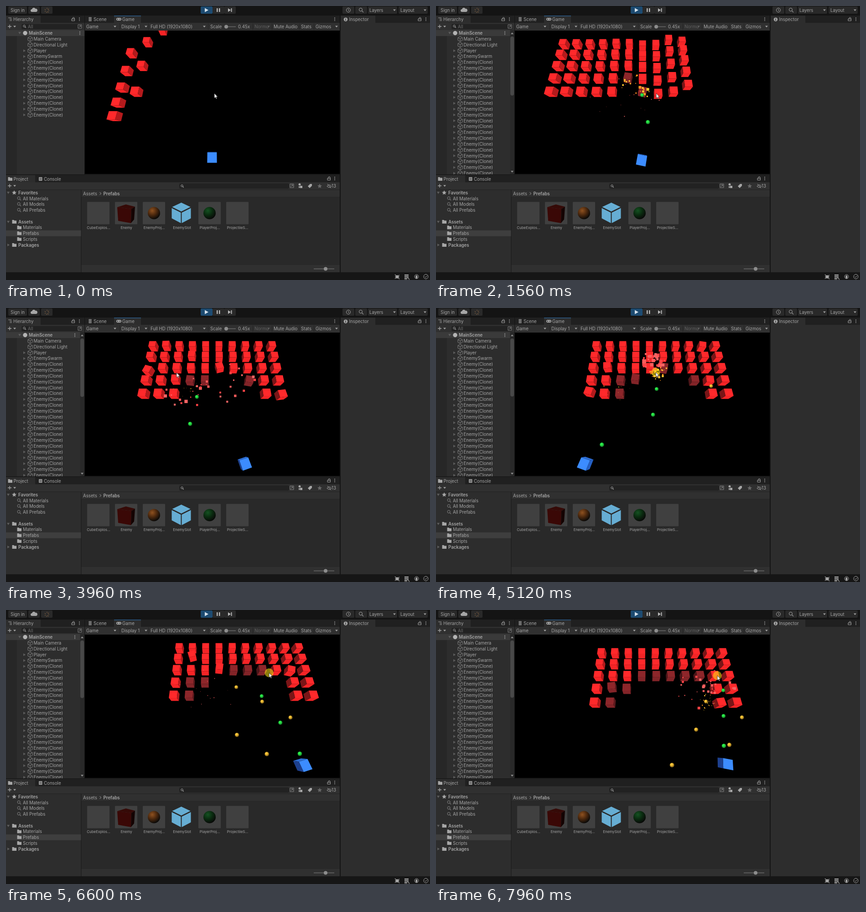
An HTML page with a canvas for the animation above (8000 ms loop, 930 px wide and 602 px high).

```html
<!DOCTYPE html>
<html lang="en">
<head>
<meta charset="utf-8">
<title>Editor play mode</title>
<style>
html, body { margin: 0; width: 100%; height: 100%; overflow: hidden; background: #141414; }
svg, canvas { position: absolute; left: 0; top: 0; }
canvas { left: 173px; top: 54px; }
text { font-family: Inter, Roboto, sans-serif; font-size: 9.7px; fill: #a6a6a6; white-space: pre; }
</style>
</head>
<body>
<svg id="ui" width="930" height="602"></svg>
<canvas id="game" width="559" height="315"></canvas>
<script>
const ui = document.getElementById('ui');
const INK = '#a6a6a6', PANEL = '#2d2d2d', STRIP = '#202020', BAR = '#303030';

/* ---------- editor interface ---------- */
function add(tag, attrs, parent = ui) {
  const el = document.createElementNS('http://www.w3.org/2000/svg', tag);
  for (const k in attrs) el.setAttribute(k, attrs[k]);
  return parent.appendChild(el);
}
const rect = (x, y, width, height, fill, rx = 0, p) => add('rect', { x, y, width, height, fill, rx }, p);
const disc = (cx, cy, r, fill, p) => add('circle', { cx, cy, r, fill }, p);
const ring = (cx, cy, r, stroke = INK) => add('circle', { cx, cy, r, stroke, fill: 'none' });
const fillPath = (d, fill = INK, p) => add('path', { d, fill }, p);
const line = (d, stroke = INK, w = 1, p) => add('path', { d, stroke, 'stroke-width': w, fill: 'none' }, p);
function label(x, y, str, opt = {}, p) {
  add('text', { x, y: y + 3.5, ...opt }, p).textContent = str;
}
const BOLD = { 'font-weight': 600 };
const caret = (x, y, c = INK) => fillPath(`M${x - 3} ${y - 1.5}h6l-3 3.5z`, c);
const fold = (x, y, open, p) => fillPath(open ? `M${x - 3} ${y - 2}h6l-3 5z` : `M${x - 2} ${y - 3}l5 3l-5 3z`, '#5c5c5c', p);
const dots = (x, y, p) => [-3, 0, 3].forEach(d => rect(x - .8, y + d - .8, 1.6, 1.6, INK, 0, p));
const plus = (x, y) => { line(`M${x - 4} ${y}h8M${x} ${y - 4}v8`, INK, 1.3); caret(x + 11, y); };
const lens = (x, y, r, c = INK) => { ring(x, y, r, c); line(`M${x + r * .7} ${y + r * .7}l${r} ${r}`, c, 1.2); };
const lock = (x, y) => line(`M${x - 3} ${y - .5}h6.5v4h-6.5zM${x - 1} ${y - 1}v-1a2 2 0 0 1 4 0v2`);
const popup = (x, y) => line(`M${x - 4} ${y - 4}h8v8h-8zM${x - 2} ${y + 2}l4 -4m-3 0h3v3`, '#858585');
const folder = (x, y) => fillPath(`M${x - 4.5} ${y - 4}h3.5l1.5 1.5h4.5v6.5h-9.5z`);
const box = (x, y, p) => line(`M${x} ${y - 5.5}l5 2.6v5.8l-5 2.6l-5 -2.6v-5.8zM${x - 5} ${y - 2.9}l5 2.6l5 -2.6M${x} ${y - .3}v5.8`, '#8c8c8c', .9, p);
const star = (x, y, c) => fillPath(`M${x} ${y - 5}l1.5 3.3l3.5 .4l-2.6 2.4l.7 3.5l-3.1 -1.8l-3.1 1.8l.7 -3.5l-2.6 -2.4l3.5 -.4z`, c);
const tab = (x, y, w) => rect(x, y, w, 17, PANEL);

// top toolbar
[[5, 41], [49, 25], [77, 25], [453, 26], [479, 25], [738, 26], [766, 26], [794, 64], [861, 64]]
  .forEach(([x, w]) => rect(x, 1, w, 16, '#292929', 2));
rect(427, 1, 26, 16, '#1d4b71', 2);
label(10, 9, 'Sign in'); label(797, 9, 'Layers'); label(865, 9, 'Layout');
caret(852, 9); caret(919, 9);
fillPath('M57 13a3 3 0 0 1 0 -6a4 4 0 0 1 7.5 -1a3.5 3.5 0 0 1 1.5 7z');
line('M90 4v2.5M94 6l-2 2M95 10h-2.5M93 14l-2 -2M89 15v-2.5M85 12l2 -1M85 7l2 1.5', '#7a5c40', 1.2);
fillPath('M436 4.5l8 4.5l-8 4.5z', '#d6e2ec');
fillPath('M462 5h2.5v8h-2.5zM467 5h2.5v8h-2.5zM487 5l6 4l-6 4zM493.5 5h2v8h-2z', '#b8b8b8');
ring(751, 9, 4.5); line('M751 6.5v3l2 1');
lens(778, 8, 3.5);

// hierarchy
rect(0, 21, 172, 349, PANEL); rect(0, 21, 172, 16, STRIP); tab(0, 21, 76);
rect(0, 37, 172, 16, BAR); rect(0, 53, 24, 317, '#272727'); rect(0, 53, 172, 13, '#3a3a3a');
line('M5 26h7M8 29h5M8 32h5'); label(16, 29, 'Hierarchy'); lock(147, 29); dots(161, 29);
plus(8, 45); rect(34, 39.5, 134, 11.5, '#222', 3); lens(40, 44, 2.2); label(48, 45, 'All', { style: 'fill:#6c6c6c' });
popup(162, 45);
fold(30, 59, true); disc(42, 59.5, 4.7, '#b4b4b4'); label(50, 59.5, 'MainScene', BOLD);
const sceneDots = add('g', {}); dots(162, 59.5, sceneDots);
const cloneRows = [];
['Main Camera', 'Directional Light', 'Player', 'EnemySwarm', ...Array(20).fill('Enemy(Clone)')].forEach((name, i) => {
  const g = add('g', {}), y = 72.5 + i * 12.83;
  if (i > 1) fold(40, y, false, g);
  box(53, y, g); label(60.5, y, name, {}, g);
  if (i > 3) cloneRows.push(g);
});
const scroller = add('g', {});
rect(162.5, 53, 9.5, 317, '#282828', 0, scroller);
fillPath('M164 62l3 -4l3 4zM164 362l3 4l3 -4z', '#8c8c8c', scroller);
const thumb = rect(163, 67, 8, 130, '#484848', 4, scroller);

// game panel
rect(173, 21, 559, 349, STRIP); tab(237, 21, 59); rect(237, 21, 59, 1.5, '#2a5a86');
rect(173, 37, 559, 17, BAR); rect(173, 54, 559, 315, '#000');
line('M181 26h7M181 29h7M181 32h7M183 24v10M186 24v10'); label(192, 29.5, 'Scene');
rect(242, 26, 11, 6, INK, 3); disc(245, 29, 1.2, PANEL); disc(250, 29, 1.2, PANEL); label(255, 29.5, 'Game');
dots(721, 29);
[[176, 'Game'], [253, 'Display 1'], [317, 'Full HD (1920x1080)'], [448, 'Scale'], [509, '0.45x'],
 [587, 'Mute Audio'], [647, 'Stats'], [679, 'Gizmos']].forEach(([x, s]) => label(x, 45.5, s));
label(545, 45.5, 'Normu', { style: 'fill:#606060' });
[239, 307, 435, 725].forEach(x => caret(x, 45)); caret(576, 45, '#606060');
line('M479 45.5h25', '#686868', 1.5); disc(483, 45.5, 4, '#8d8d8d');
[249, 312, 443, 541, 583, 643, 675].forEach(x => line(`M${x}.5 38v15`, '#242424'));

// inspector
rect(734, 21, 196, 564, PANEL); rect(734, 21, 196, 16, STRIP); tab(734, 21, 76);
disc(745, 29.5, 4.2, INK); line('M745 29v3M745 26.5v1.2', STRIP, 1.5); label(752.5, 29.5, 'Inspector');
lock(907, 29); dots(921, 29);

// project
rect(0, 370, 732, 215, PANEL); rect(0, 370, 732, 1.5, '#141414'); rect(0, 371.5, 732, 16, STRIP); tab(0, 371.5, 64);
rect(0, 387.5, 732, 16.5, BAR); rect(165, 404, 567, 16, BAR); rect(165, 420, 567, 149, '#292929'); rect(165, 569, 567, 16, BAR);
rect(164.5, 404, 1, 181, '#191919'); rect(0, 403.5, 732, .7, '#1c1c1c'); rect(166, 419.5, 566, .7, '#222');
folder(9, 380); label(16.5, 380, 'Project'); lock(708, 379); dots(721, 379);
rect(72, 376, 7.5, 8, INK, 1); line('M73 378.5h5.5M73 381.5h5.5', STRIP); label(83, 380, 'Console');
plus(8, 395); rect(380, 389.5, 241, 12, '#222', 3); lens(386, 395, 2.2);
popup(627, 395);
disc(644, 392, 2.5, INK); rect(645, 395, 5, 5, INK); rect(642, 396, 2.5, 3.5, INK);
fillPath('M662 396l5 -5h4v4l-5 5z'); star(688, 395.5, '#686868');
line('M704 396q5 -6 10 0q-5 5 -10 0M705 391l8 9'); label(714, 395.5, '13');
rect(0, 493, 164.5, 12.8, '#3e3e3e');
[['Favorites', 410, star], ['Assets', 474, folder], ['Packages', 525, folder]].forEach(([name, y, icon]) => {
  fold(5, y, name !== 'Packages'); icon(18, y, INK); label(27, y, name, BOLD);
});
['All Materials', 'All Models', 'All Prefabs'].forEach((s, i) => { const y = 423 + i * 12.8; lens(28, y - 1, 3, '#858585'); label(37, y, s); });
['Materials', 'Prefabs', 'Scripts'].forEach((s, i) => { const y = 486.5 + i * 12.8; folder(29, y); label(37, y, s); });
label(169, 412, 'Assets'); line('M205.5 409l3 3l-3 3'); label(213.5, 412, 'Prefabs', BOLD);

function ball(cx, cy, light, dark, id) {
  const g = add('radialGradient', { id, cx: .36, cy: .3, r: .72 });
  [light, dark, '#080807'].forEach((c, i) => add('stop', { offset: i / 2, 'stop-color': c }, g));
  disc(cx, cy, 13.5, `url(#${id})`);
}
['CubeExplos...', 'Enemy', 'EnemyProj...', 'EnemySlot', 'PlayerProj...', 'ProjectileS...'].forEach((s, i) => {
  const x = 178 + i * 61;
  if (i !== 3) rect(x, 430.5, 49, 49, '#404040', 1);
  label(x + 25, 486.5, s, { 'text-anchor': 'middle', style: 'font-size:7.9px' });
});
fillPath('M244 442l19 -6l20 5l-8 5z', '#350a07'); fillPath('M244 442l31 4l-1 31l-28 -5z', '#3a0806'); fillPath('M275 446l8 -5l-2 28l-7 8z', '#140403');
ball(324.5, 455, '#8f5220', '#4d290e', 'amber'); ball(446.5, 455, '#155222', '#0a2c10', 'leaf');
fillPath('M384.5 432l20 9.5l-20 10l-20 -10zM363.5 444l20 10v23l-20 -10.5zM405.5 444l-20 10v23l20 -10.5z', '#66add3');
line('M675 577.5h45', '#686868', 1.5); disc(701, 577.5, 4, '#8d8d8d');

// status bar
rect(0, 585, 930, 17, '#161616');
disc(858, 595, 3.5, INK); line('M853 590l10 10M853 595h10M853 599l3 -2M863 591l-3 2', INK, 1.2);
[590, 594, 598].forEach(y => rect(874, y, y < 598 ? 9 : 6, 2.5, INK)); line('M881 597l4 4', INK, 1.2);
ring(900.5, 594.5, 4.5); rect(898.5, 592, 4, 7, INK, 1);
ring(921, 594.5, 5); line('M918.5 594.5l2 2l3.5 -4');

/* ---------- camera ---------- */
const ctx = document.getElementById('game').getContext('2d');
ctx.translate(-173, -54);
const MID_X = 452.5, MID_Y = 211.5, FOCAL = 273, CAM_H = 13.8;
const SIN = Math.sin(1.227), COS = Math.cos(1.227);
const depth = (h, z) => (CAM_H - h) * SIN + z * COS;
function project(x, h, z) {
  const d = depth(h, z);
  return [MID_X + FOCAL * x / d, MID_Y - FOCAL * (z * SIN - (CAM_H - h) * COS) / d];
}
function ground(sx, sy) {
  const m = (MID_Y - sy) / FOCAL, z = CAM_H * (m * SIN + COS) / (SIN - m * COS);
  return [(sx - MID_X) / FOCAL * depth(0, z), z];
}
function track(keys, t) {
  let i = 0;
  while (i < keys.length - 2 && t > keys[i + 1][0]) i++;
  const [a, b] = [keys[i], keys[i + 1]], p = Math.max(0, Math.min(1, (t - a[0]) / (b[0] - a[0])));
  return a.slice(1).map((v, k) => v + (b[k + 1] - v) * p);
}
function seeded(seed) {
  let s = seed * 7919 + 17;
  const next = () => (s = (s * 16807) % 2147483647) / 2147483647;
  next(); next();
  return next;
}

/* ---------- choreography ---------- */
const PITCH = 1.84, CUBE = .94, SHOT_GAP = 218, SHOT_PHASE = 46, FOE_GAP = 300;
const swarm = [[1650, -1.48], [2600, -.96], [3960, 0], [5120, 1.03], [6980, 2.25], [7960, 1.46]];
const playerPath = [[1200, 452], [1355, 466], [1560, 451], [2445, 399], [2600, 402], [3300, 536], [3535, 412], [3750, 398],
  [3960, 523], [4840, 480], [5120, 328], [6200, 594], [6600, 650], [7400, 672], [7960, 634]];
const pointer = [[0, 457, 192], [1560, 483, 192], [2600, 394, 174], [3960, 374, 142], [5120, 482, 141], [6600, 577, 138], [7960, 617, 144]];
const blasts = [[5000, 475, 118], [7600, 595, 165]];

const RED = { top: '#ff292b', front: '#f52426', left: '#7a1517', right: '#b41a1c', back: '#d92022' };
const DIM = { top: '#8d262a', front: '#832428', left: '#4c1518', right: '#5e191d', back: '#702024' };
const BLUE = { top: '#3c8cff', front: '#3080f4', left: '#1d408e', right: '#2560c4', back: '#2d6cd2' };
const DEBRIS = { life: 700, count: 16, reach: 75, size: 10, colors: ['#ff5c5c', '#ff4446', '#f46464'] };
const SPARKS = { life: 350, count: 10, reach: 30, size: 8, colors: ['#ffc830', '#ff9522'] };
// axis normals in (x, height, z)
const FACES = { top: [0, 1, 0], front: [0, 0, -1], back: [0, 0, 1], left: [-1, 0, 0], right: [1, 0, 0] };

function cube(x, z, turn, palette) {
  const a = turn * Math.PI / 180, c = Math.cos(a), s = Math.sin(a), half = CUBE / 2;
  const spin = ([px, h, pz]) => [px * c + pz * s, h, pz * c - px * s];
  for (const name in FACES) {
    const n = FACES[name], [nx, nh, nz] = spin(n);
    if (nx * (x + nx * half) + nh * (nh * half - CAM_H) + nz * (z + nz * half) >= 0) continue;
    const u = [n[1], n[2], n[0]], v = [n[2], n[0], n[1]];
    ctx.beginPath();
    for (const [i, j] of [[-1, -1], [1, -1], [1, 1], [-1, 1]]) {
      const [px, h, pz] = spin(n.map((k, q) => (k + u[q] * i + v[q] * j) * half));
      ctx.lineTo(...project(x + px, h, z + pz));
    }
    ctx.fillStyle = palette[name];
    ctx.fill();
  }
}
function sphere(x, z, light, dark) {
  const [sx, sy] = project(x, 0, z), r = .23 * FOCAL / depth(0, z);
  const g = ctx.createRadialGradient(sx - r * .2, sy - r * .3, r * .4, sx, sy, r * 1.25);
  g.addColorStop(0, light); g.addColorStop(1, dark);
  ctx.fillStyle = g;
  ctx.beginPath(); ctx.arc(sx, sy, r, 0, 7); ctx.fill();
}
function slot(col, row, t) {
  const drop = .9 * Math.max(0, Math.min(1, (t - 6980) / 320));
  return [(col - 4.5 + track(swarm, t)[0]) * PITCH, 13.65 - PITCH * row - drop];
}
// hits spread outwards from the middle columns and upwards from the lowest row
function damage(col, row) {
  const rank = 4 - row;
  if (Math.abs(col - 4) > 3 || rank > 2) return [Infinity, Infinity];
  const hit = 530 + 1150 * Math.abs(col - 5.2) + 600 * rank ** 2.8;
  return [hit, hit + 160 + 1300 * rank + 17 * (hit / 1000) ** 3];
}
function enemy(col, row, t) {
  const [hit, death] = damage(col, row), age = t + 284 - 142 * col - 28 * (4 - row);
  if (age < 0 || t >= death) return;
  const rnd = seeded(col * 5 + row), nudge = Math.exp(-(((t - 3500 - 4500 * rnd()) / 200) ** 2));
  let [x, z] = slot(col, row, t), turn = nudge * (rnd() - .5) * 50;
  z += 10 * Math.exp(-.0042 * age) * Math.cos(Math.PI * age / 284) + nudge * (rnd() - .5);
  if (t >= hit) turn += 25 * Math.exp((hit - t) / 200);
  cube(x, z, turn, t >= hit ? DIM : RED);
}
function burst(kind, start, t, sx, sy) {
  const p = (t - start) / kind.life;
  if (!(p >= 0 && p < 1)) return;
  const rnd = seeded(Math.round(sx + sy));
  for (let i = 0; i < kind.count; i++) {
    const a = rnd() * 6.283, far = kind.reach * (.15 + rnd()) * (1 - (1 - p) ** 2);
    const w = kind.size * (.25 + .75 * rnd()) * (1 - p) ** .7;
    ctx.fillStyle = kind.colors[i % kind.colors.length];
    ctx.fillRect(sx + Math.cos(a) * far - w / 2, sy + Math.sin(a) * far * .8 + 28 * p * p - w / 2, w, w);
  }
}
function drawBursts(t) {
  for (let col = 0; col < 10; col++) for (let row = 0; row < 5; row++) {
    damage(col, row).forEach((at, i) => {
      if (t < at) return;
      const [x, z] = slot(col, row, at);
      burst(i ? DEBRIS : SPARKS, at, t, ...project(x, 0, z));
    });
  }
  for (const [at, x, y] of blasts) {
    burst({ ...DEBRIS, count: 30 }, at, t, x, y);
    burst({ ...SPARKS, life: 500, count: 20, size: 6 }, at, t, x + 6, y + 26);
  }
}
function drawShots(t) {
  for (let i = 0, at; (at = 5000 + FOE_GAP * i) <= t; i++) {
    const [x, z] = slot(4 + 5 * seeded(i)(), 3, at), now = z - .0065 * (t - at);
    if (now > -2.2) sphere(x, now, '#ffc93a', '#4a3508');
  }
  for (let at = SHOT_PHASE; at <= t; at += SHOT_GAP) {
    const z = -.5 + .015 * (t - at);
    if (z < 7.6) sphere(ground(track(playerPath, at)[0], 332)[0], z, '#2cf04c', '#0a5a18');
  }
}
function drawPlayer(t) {
  const [x] = track(playerPath, t), speed = (x - track(playerPath, t - 120)[0]) / 120;
  const turn = -17 * Math.tanh(speed * 10);
  cube(...ground(x, 332 + .55 * Math.abs(turn)), turn, BLUE);
}
function drawPointer(t) {
  const [x, y] = track(pointer, t), sinceShot = (t - SHOT_PHASE) % SHOT_GAP;
  if (t > 1000 && sinceShot < 170) {
    ctx.fillStyle = 'rgba(255,228,20,.55)';
    ctx.beginPath(); ctx.arc(x, y, 9.7, 0, 7); ctx.fill();
  }
  const arrow = new Path2D(`M${x} ${y}v10.5l2.4 -2.2l1.6 3.7l1.6 -.7l-1.6 -3.6h3.3z`);
  ctx.fillStyle = '#f2f2f2'; ctx.strokeStyle = '#222'; ctx.lineWidth = .7;
  ctx.fill(arrow); ctx.stroke(arrow);
}
function drawGame(t) {
  ctx.fillStyle = '#000';
  ctx.fillRect(173, 54, 559, 315);
  for (let row = 0; row < 5; row++) {
    // outer columns first, so inner cubes overlap them
    for (let i = 0; i < 5; i++) { enemy(i, row, t); enemy(9 - i, row, t); }
  }
  drawBursts(t);
  drawShots(t);
  drawPlayer(t);
  drawPointer(t);
}
function drawHierarchy(t) {
  const count = Math.min(50, 10 + 5 * Math.floor(t / 142)), full = count >= 20;
  cloneRows.forEach((g, i) => g.setAttribute('visibility', i < count ? 'visible' : 'hidden'));
  scroller.setAttribute('visibility', full ? 'visible' : 'hidden');
  sceneDots.setAttribute('transform', `translate(${full ? -11 : 0})`);
  thumb.setAttribute('height', Math.min(295, 298 * 310 / (12.85 * (count + 5)) - t / 1600));
}
function frame() {
  const t = Math.floor(performance.now() % 8000 / 40) * 40;
  drawGame(t);
  drawHierarchy(t);
  requestAnimationFrame(frame);
}
frame();
</script>
</body>
</html>
```
